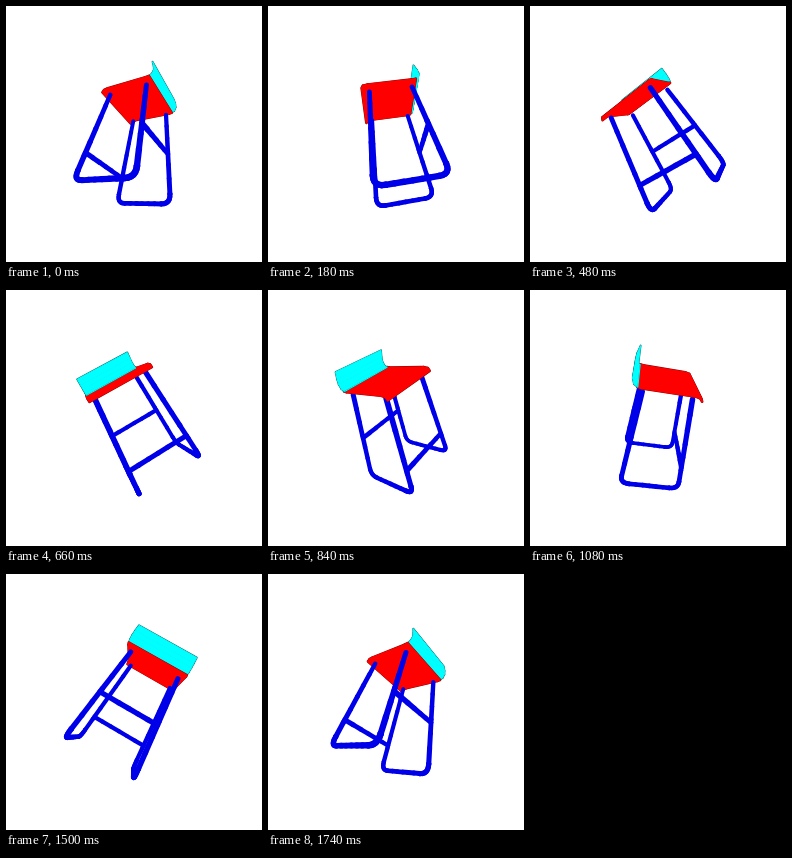
Write an HTML page with a canvas that moves like this. It is 256 by 256 pixels and loops after 1800 ms.

```html
<!DOCTYPE html>
<html lang="en">
<head>
<meta charset="utf-8">
<title>Turning bar stool</title>
<style>
  html, body { margin: 0; width: 100%; height: 100%; overflow: hidden; background: #fff; }
  canvas { display: block; width: 100vw; height: 100vh; }
</style>
</head>
<body>
<canvas id="stage" width="256" height="256"></canvas>
<script>
const ctx = document.getElementById('stage').getContext('2d');
const STEP = 60, STEPS = 30;
const CENTER_X = 128.5, CENTER_Y = 128, DISTANCE = 222;

// Stool axes in the world (x right, y away, z up) before turning.
const ORIGIN = [-8.6, -29.9, -51];
const SIDE = [0.473, 0.724, -0.5];
const FRONT = [-0.865, 0.483, -0.138];
const UP = [0.141, 0.497, 0.855];

const SEAT_HEIGHT = 100.5;
const LEG = { color: '#0000e8', width: 4.7 };
const SEAT = { color: '#ff0000', edge: '#800000', width: 2 };
const BACK = { color: '#00ffff', edge: '#006868', width: 1 };

// Side profiles as [forward, height].
const seatProfile = [[28, 97.5], [26.5, 100], [22, 101], [-22, 101], [-25.5, 101.5]];
const backProfile = [[-25.5, 101.5], [-28.5, 103.5], [-30, 108], [-29.3, 113], [-27.3, 120]];

const mix = (p, q, t) => p.map((n, i) => n + (q[i] - n) * t);
const gap = (p, q) => Math.hypot(...p.map((n, i) => n - q[i]));

function projector(angle) {
  const cos = Math.cos(angle), sin = Math.sin(angle);
  return ([a, b, c]) => {
    const [x, y, z] = ORIGIN.map((o, i) => o + a * SIDE[i] + b * FRONT[i] + c * UP[i]);
    const scale = DISTANCE / (DISTANCE + x * sin + y * cos);
    return [CENTER_X + (x * cos - y * sin) * scale, CENTER_Y - z * scale, scale];
  };
}

function seenFromAbove(angle) {
  const lean = UP[0] * Math.sin(angle) + UP[1] * Math.cos(angle);
  const plane = ORIGIN.reduce((sum, o, i) => sum + o * UP[i], SEAT_HEIGHT);
  return -lean * DISTANCE > plane;
}

function straight(p, q, parts = 6) {
  return Array.from({ length: parts + 1 }, (_, i) => mix(p, q, i / parts));
}

function bend(p, corner, q) {
  const from = mix(corner, p, 9 / gap(corner, p));
  const to = mix(corner, q, 9 / gap(corner, q));
  return Array.from({ length: 7 }, (_, i) =>
    mix(mix(from, corner, i / 6), mix(corner, to, i / 6), i / 6));
}

const footAt = (side, end) => [side * 33.8, end * 29.3, 0];
const headAt = (side, end) => [side * 25.2, end * 21.2, 96];

function legLoop(side) {
  const [h1, f1, f2, h2] = [headAt(side, 1), footAt(side, 1), footAt(side, -1), headAt(side, -1)];
  const front = bend(h1, f1, f2), rear = bend(f1, f2, h2);
  return [
    ...straight(h1, front[0]), ...front,
    ...straight(front[6], rear[0]), ...rear,
    ...straight(rear[6], h2)
  ];
}

function crossbar(end, height) {
  const at = side => mix(footAt(side, end), headAt(side, end), height);
  return straight(at(-1), at(1));
}

const tubes = [legLoop(-1), legLoop(1), crossbar(1, 0.275), crossbar(-1, 0.51)];

function drawTube(points, project) {
  const flat = points.map(project);
  ctx.strokeStyle = LEG.color;
  for (let i = 1; i < flat.length; i++) {
    const [x1, y1, s1] = flat[i - 1], [x2, y2, s2] = flat[i];
    ctx.lineWidth = LEG.width * (s1 + s2) / 2;
    ctx.beginPath();
    ctx.moveTo(x1, y1);
    ctx.lineTo(x2, y2);
    ctx.stroke();
  }
}

function drawSheet(profile, { color, edge, width }, project) {
  const rim = side => profile.map(([b, c]) => project([side * 30.3, b, c]));
  const left = rim(-1), right = rim(1);
  const paint = (tone, extra) => {
    ctx.fillStyle = ctx.strokeStyle = tone;
    ctx.lineWidth = width + extra;
    for (let i = 1; i < profile.length; i++) {
      ctx.beginPath();
      for (const [x, y] of [left[i - 1], left[i], right[i], right[i - 1]]) ctx.lineTo(x, y);
      ctx.closePath();
      ctx.fill();
      ctx.stroke();
    }
  };
  paint(edge, 0.8);
  paint(color, 0);
}

function draw(angle) {
  const project = projector(angle);
  const layers = [
    () => tubes.forEach(points => drawTube(points, project)),
    () => drawSheet(seatProfile, SEAT, project),
    () => drawSheet(backProfile, BACK, project)
  ];
  // The seat plane separates legs from backrest, so it decides the order.
  if (!seenFromAbove(angle)) layers.reverse();
  ctx.fillStyle = '#fff';
  ctx.fillRect(0, 0, 256, 256);
  ctx.lineCap = ctx.lineJoin = 'round';
  layers.forEach(layer => layer());
}

function tick() {
  const step = Math.floor(performance.now() / STEP) % STEPS;
  draw(step / STEPS * 2 * Math.PI);
  requestAnimationFrame(tick);
}
tick();
</script>
</body>
</html>
```
